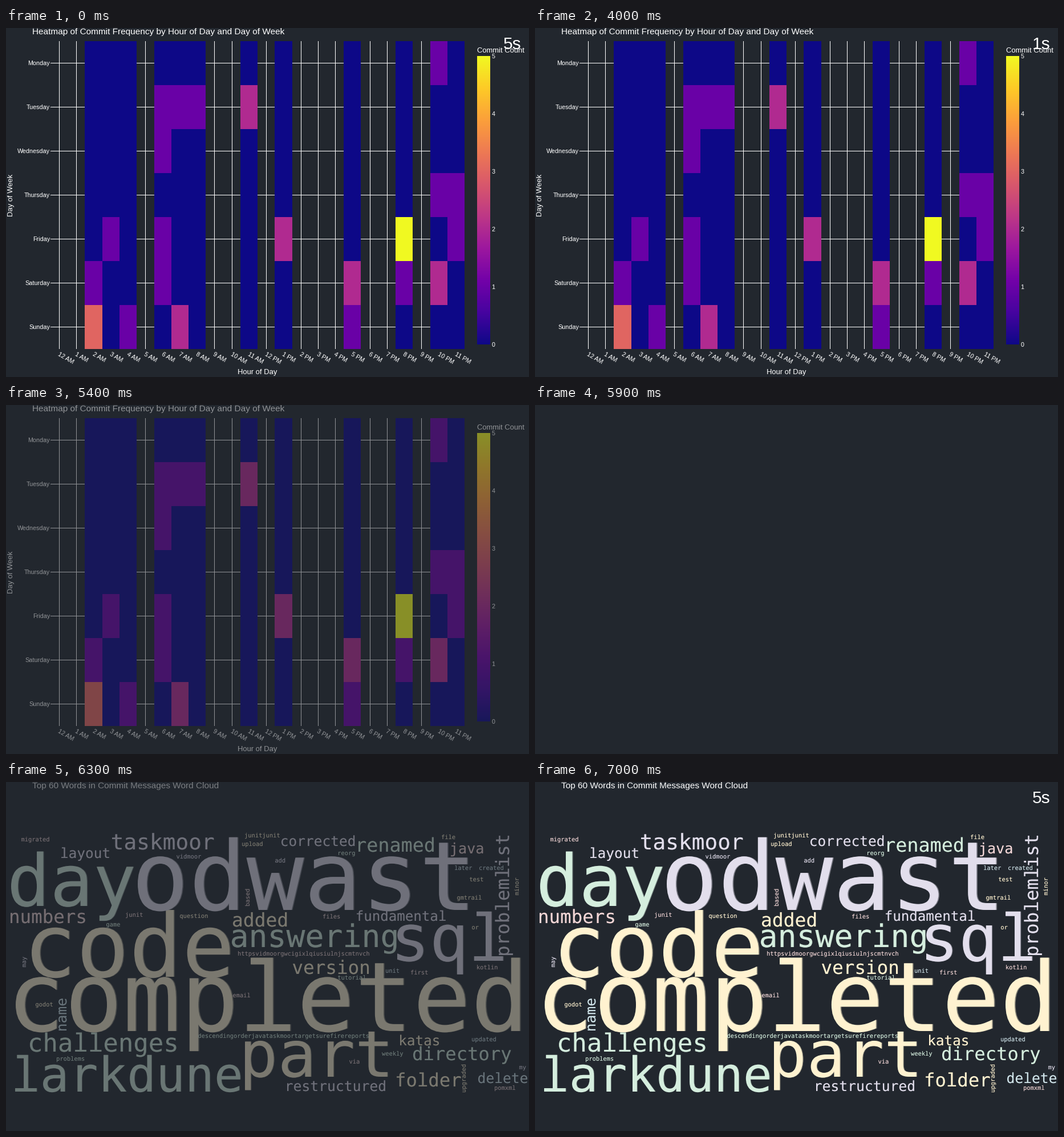
A matplotlib script for the animation above (8000 ms loop, 917 by 611 pixels).

```python
import numpy as np
import matplotlib.pyplot as plt
from matplotlib.animation import FuncAnimation
from matplotlib.patches import PathPatch, Rectangle
from matplotlib.path import Path
from matplotlib.textpath import TextPath

W, H, DPI = 917, 611, 64
BG = (34, 39, 46)
BG_HEX = "#22272e"

plt.rcParams["font.family"] = "Liberation Sans"
fig = plt.figure(figsize=(W / DPI, H / DPI), dpi=DPI, facecolor=BG_HEX)
ax = fig.add_axes([0, 0, 1, 1])
ax.set(xlim=(0, W), ylim=(H, 0))
ax.axis("off")


def label(x, y, text, px, **kw):
    return ax.text(x, y, text, fontsize=px * 72 / DPI, color="white",
                   va="baseline", rotation_mode="anchor", **kw)


# ---- heatmap ----
LEFT, TOP, COL, ROW = 78, 23, 30.25, 77
RIGHT, BOTTOM = 804, 562
BAR_TOP, BAR_BOTTOM = 49, 554
DAYS = ["Monday", "Tuesday", "Wednesday", "Thursday", "Friday",
        "Saturday", "Sunday"]
HOURS = [2, 3, 4, 6, 7, 8, 11, 13, 17, 20, 22, 23]
COUNTS = [
    {22: 1},
    {6: 1, 7: 1, 8: 1, 11: 2},
    {6: 1},
    {22: 1, 23: 1},
    {3: 1, 6: 1, 13: 2, 20: 5, 23: 1},
    {2: 1, 6: 1, 17: 2, 20: 1, 22: 2},
    {2: 3, 4: 1, 7: 2, 17: 1},
]
PLASMA = ["0d0887", "46039f", "7201a8", "9c179e", "bd3786",
          "d8576b", "ed7953", "fb9f3a", "fdca26", "f0f921"]
STOPS = np.array([[int(c[k:k + 2], 16) for k in (0, 2, 4)] for c in PLASMA])


def plasma(t):
    pos = np.linspace(0, 1, len(STOPS))
    return np.stack([np.interp(t, pos, STOPS[:, k]) for k in range(3)], -1)


def heat_image():
    img = np.empty((H, W, 3))
    img[:] = BG
    for h in range(24):
        img[TOP:BOTTOM, round(LEFT + COL * (h + 0.5) - 0.1)] = 255
    for d in range(7):
        img[TOP + ROW * d + 38, LEFT:RIGHT] = 255
    for d, row in enumerate(COUNTS):
        y = TOP + ROW * d
        for h in HOURS:
            x0, x1 = round(LEFT + COL * h), round(LEFT + COL * (h + 1))
            img[y:y + ROW, x0:x1] = plasma(row.get(h, 0) / 5)
    ys = np.arange(BAR_TOP, BAR_BOTTOM)
    t = (BAR_BOTTOM - ys - 0.5) / (BAR_BOTTOM - BAR_TOP)
    img[BAR_TOP:BAR_BOTTOM, 826:849] = plasma(t)[:, None]
    return img.round().astype(np.uint8)


def make_heatmap():
    parts = [
        ax.imshow(heat_image(), extent=(0, W, H, 0), aspect="auto",
                  interpolation="nearest"),
        label(45.5, 11, "Heatmap of Commit Frequency by Hour of Day "
              "and Day of Week", 15.35),
        label(441, 606, "Hour of Day", 13, ha="center"),
        label(12, 292.5, "Day of Week", 13, ha="center", rotation=90),
        label(826, 43, "Commit Count", 13),
    ]
    for d, day in enumerate(DAYS):
        parts.append(label(77, TOP + ROW * d + 42, day, 10.8, ha="right"))
    for h in range(24):
        text = f"{(h - 1) % 12 + 1} {'AM' if h < 12 else 'PM'}"
        x = LEFT + COL * (h + 0.5) - 3
        parts.append(label(x, 573, text, 10.8, rotation=-30))
    for v in range(6):
        parts.append(label(851.5, BAR_BOTTOM + 4 - 101 * v, str(v), 10.8))
    return parts


# ---- word cloud ----
YELLOW, GREEN, LILAC, PINK, BLUE = (
    "#fff2d0", "#d5eede", "#e2deec", "#f2d6d6", "#d0e4ea")

# word, left, baseline, size
BIG = {
    YELLOW: [("completed", 17, 436, 169), ("code", 45, 341, 154),
             ("part", 419, 516, 112.6), ("added", 398, 253, 33),
             ("version", 503, 336, 32.6), ("katas", 691, 461, 24.3),
             ("folder", 685, 533, 32.3)],
    GREEN: [("day", 9, 217, 125.5), ("larkdune", 16, 542, 84.5),
            ("answering", 396, 289, 54.8), ("challenges", 42, 472, 44),
            ("directory", 714, 487, 32.2), ("renamed", 618, 122, 33.4)],
    LILAC: [("odwast", 231, 224, 167.5), ("sql", 686, 313, 113.5),
            ("taskmoor", 186, 118, 37.8), ("layout", 97, 133, 24.4),
            ("corrected", 483, 112, 24.5), ("fundamental", 615, 243, 24.1),
            ("restructured", 493, 541, 24.7),
            ("problemlist", 882, 303, 32.5)],
    PINK: [("numbers", 8, 247, 32.5), ("java", 780, 125, 25.2)],
    BLUE: [("name", 106, 435, 24.7), ("delete", 828, 527, 24.6)],
}
SMALL_SIZE = 10.4
SMALL = {
    YELLOW: [("junitjunit", 419, 97), ("upload", 414, 112),
             ("file", 764, 100), ("test", 813, 174), ("gmtrail", 791, 206),
             ("minor", 899, 198), ("question", 305, 238), ("or", 817, 258),
             ("godot", 52, 393), ("upgraded", 806, 543)],
    GREEN: [("reorg", 583, 128), ("game", 176, 253), ("tutorial", 582, 346),
            ("descendingorderjavataskmoortargetsurefirereports", 337, 448),
            ("problems", 89, 488), ("weekly", 659, 479)],
    LILAC: [("vidmoor", 299, 134), ("add", 472, 141), ("may", 35, 324),
            ("my", 900, 503)],
    PINK: [("migrated", 27, 104), ("based", 427, 217), ("junit", 210, 236),
           ("files", 556, 239),
           ("httpsvidmoorgwcigixlqiusiulnjscmtnvch", 407, 304),
           ("kotlin", 826, 328), ("first", 710, 337), ("email", 398, 377),
           ("via", 602, 493), ("pomxml", 857, 539)],
    BLUE: [("later", 787, 154), ("created", 830, 154), ("unit", 666, 334),
           ("updated", 817, 454)],
}
UPRIGHT = {"problemlist", "name", "minor", "based", "may", "upgraded"}
ADVANCE = 0.602


def glyph(ch, size):
    """Outline of one letter; l is a dotless i raised to full height."""
    path = TextPath((0, 0), "ı" if ch == "l" else ch, size=size,
                    prop={"family": "DejaVu Sans Mono"})
    pts = np.array(path.vertices)
    if ch == "l":
        pts[pts[:, 1] > 0.3 * size, 1] += 0.213 * size
    return pts, path.codes


def word_patches(word, x, y, size, color):
    """The word and the faint edge along its right side."""
    pts, codes = [], []
    for k, ch in enumerate(word):
        p, c = glyph(ch, size)
        pts.append(p + (k * ADVANCE * size, 0))
        codes.append(c)
    pts, codes = np.vstack(pts), np.concatenate(codes)
    along = pts[:, 0] - Path(pts, codes).get_extents().x0
    up = pts[:, 1]
    if word in UPRIGHT:
        xy = np.column_stack([x - up, y - along])
    else:
        xy = np.column_stack([x + along, y - up])
    edge = PathPatch(Path(xy + (0.01 * size, 0), codes), fc=color, lw=0,
                     alpha=0.45)
    face = PathPatch(Path(xy, codes), fc=color, lw=0)
    return [ax.add_patch(edge), ax.add_patch(face)]


def make_cloud():
    parts = [label(45.5, 11, "Top 60 Words in Commit Messages Word Cloud",
                   15.35)]
    for color, words in BIG.items():
        for w in words:
            parts += word_patches(*w, color)
    for color, words in SMALL.items():
        for w in words:
            parts += word_patches(*w, SMALL_SIZE, color)
    return parts


heatmap = make_heatmap()
cloud = make_cloud()
ax.set(xlim=(0, W), ylim=(H, 0))
cover = ax.add_patch(Rectangle((-2, -2), W + 4, H + 4, fc=BG_HEX, lw=0,
                               zorder=10))
timer = label(872, 37, "", 30, zorder=11)

# ---- timing, in steps of 100 ms ----
STEP, STEPS = 100, 80
FADE_OUT, SWAP, SHOWN = 50, 60, 70


def update(i):
    second = i >= SWAP
    if i < FADE_OUT:
        level = 1
    elif not second:
        level = 1 - (i - FADE_OUT + 1) / 10
    else:
        level = min(1, (i - SWAP + 1) / 10)
    for part in heatmap:
        part.set_visible(not second)
    for part in cloud:
        part.set_visible(second)
    cover.set_alpha(1 - level)
    if i < FADE_OUT:
        timer.set_text(f"{5 - i // 10}s")
    elif i >= SHOWN:
        timer.set_text(f"{5 - (i - SHOWN) // 10}s")
    else:
        timer.set_text("")
    return [*heatmap, *cloud, cover, timer]


anim = FuncAnimation(fig, update, frames=STEPS, interval=STEP, repeat=True,
                     repeat_delay=0, blit=False)
plt.show()
```
